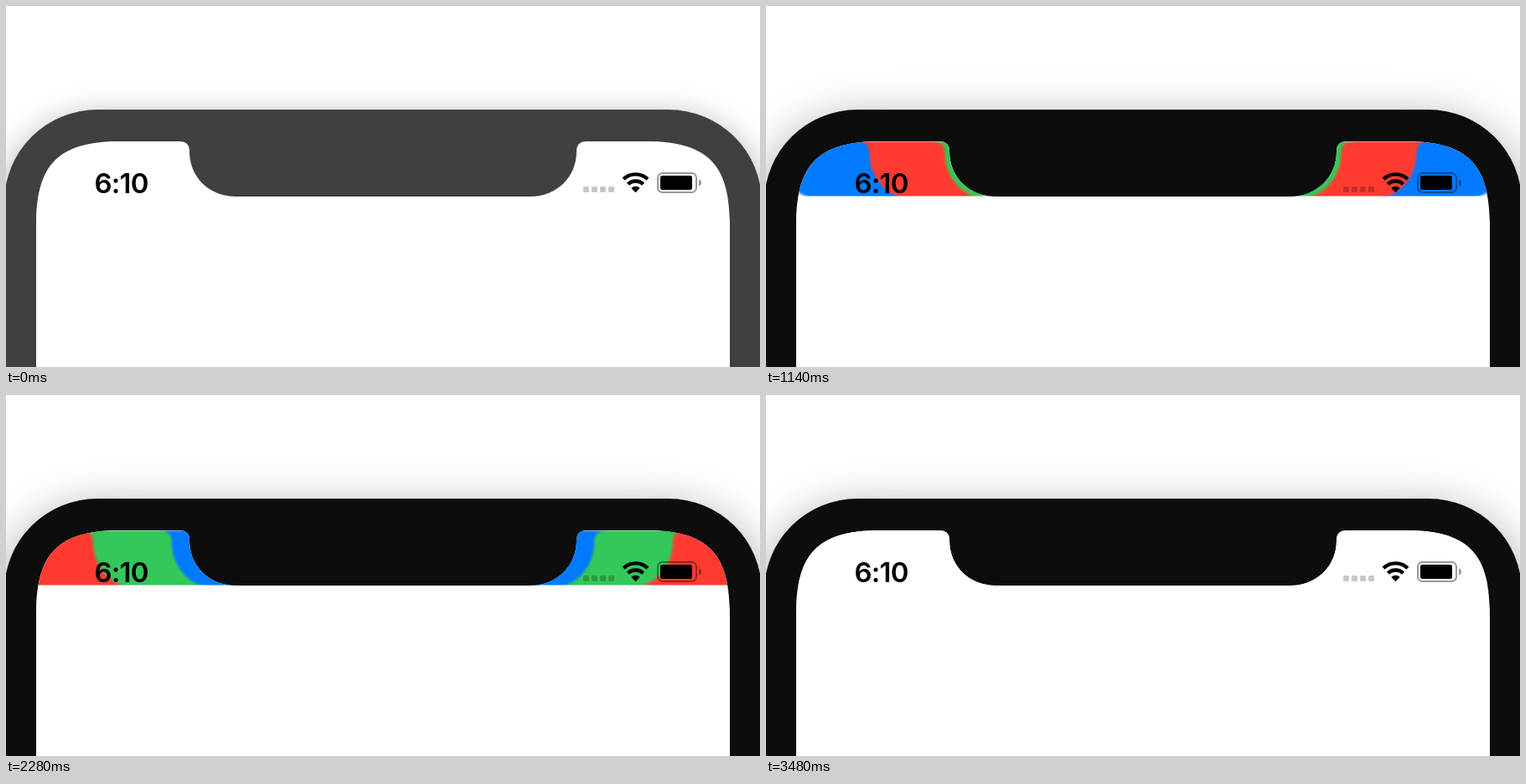
Animation of 900x432 px, one loop 3.54 s. Source, as an HTML page:

```html
<!DOCTYPE html>
<html lang="en">
<head>
<meta charset="utf-8">
<title>Notch ripple</title>
<style>
  html, body { margin: 0; width: 100%; height: 100%; overflow: hidden; background: #fff; }
  svg { display: block; width: 900px; height: 432px; }
  #phone { fill: #404040; }
  #phone.active { fill: #0d0d0d; }
  #phone .on, #phone.active .off { visibility: hidden; }
  #phone.active .on { visibility: visible; }
  text { font: 600 33px Inter, "Liberation Sans", sans-serif; letter-spacing: -.8px; }
</style>
</head>
<body>
<svg viewBox="0 0 900 432">
  <defs>
    <path id="body" d="M-2 800V235A111 111 0 0 1 109 124H791A111 111 0 0 1 902 235V800Z"/>
    <path id="half" d="M36 500V264C36 195 57 162 135 162H207Q219 162 219 174C219 205 243 228 274 228H450.5V500Z"/>
    <clipPath id="bar"><rect x="30" y="162.4" width="420" height="65"/></clipPath>
    <clipPath id="ear" clip-path="url(#bar)"><use href="#half"/></clipPath>
    <filter id="soft" filterUnits="userSpaceOnUse" x="0" y="130" width="470" height="120" color-interpolation-filters="sRGB">
      <feGaussianBlur stdDeviation="1.4"/>
    </filter>
    <filter id="glowOff" filterUnits="userSpaceOnUse" x="-150" y="0" width="1200" height="950">
      <feGaussianBlur stdDeviation="20"/>
    </filter>
    <filter id="glowOn" filterUnits="userSpaceOnUse" x="-150" y="0" width="1200" height="950">
      <feGaussianBlur stdDeviation="30"/>
    </filter>
    <linearGradient id="fade">
      <stop offset="0" stop-color="#fff" stop-opacity="0"/>
      <stop offset="1" stop-color="#fff"/>
    </linearGradient>
  </defs>

  <g id="phone">
    <g fill="#000">
      <use class="off" href="#body" y="10" opacity=".35" filter="url(#glowOff)"/>
      <use class="on" href="#body" y="16" opacity=".4" filter="url(#glowOn)"/>
    </g>
    <use href="#body"/>
  </g>

  <g id="side">
    <use href="#half" fill="#fff"/>
    <g clip-path="url(#ear)">
      <g id="waves" filter="url(#soft)"></g>
      <g id="tail">
        <rect x="-1" y="150" width="2" height="90" fill="url(#fade)"/>
        <rect x="0.99" y="150" width="60" height="90" fill="#fff"/>
      </g>
    </g>
  </g>
  <use href="#side" transform="translate(900) scale(-1 1)"/>

  <text x="105.5" y="223.5">6:10</text>
  <g fill-opacity=".22">
    <rect x="689" y="216" width="7" height="7" rx="1.5"/>
    <rect x="699" y="216" width="7" height="7" rx="1.5"/>
    <rect x="709" y="216" width="7" height="7" rx="1.5"/>
    <rect x="719" y="216" width="7" height="7" rx="1.5"/>
  </g>
  <g fill="none" stroke="#000" stroke-width="4.4">
    <path d="M737.1 207.2A20.8 20.8 0 0 1 765.9 207.2"/>
    <path d="M742.4 213.2A13 13 0 0 1 760.6 213.2"/>
  </g>
  <path d="M751.5 223.2L746.3 218A7.4 7.4 0 0 1 756.7 218Z"/>
  <rect x="778" y="200" width="46" height="23" rx="5.5" fill="none" stroke="#000" stroke-opacity=".4" stroke-width="2"/>
  <rect x="781" y="203" width="38" height="17" rx="2.5"/>
  <path d="M827 207.5Q830 208.5 830 211.5T827 215.5Z" fill-opacity=".4"/>
</svg>

<script>
  const LOOP = 3540, STEP = 60;
  const FOCUS = 420;
  const FIRST = 631, GAP = 272;
  const FADE = 2700, FADE_LEN = 780;
  const BLUE = '#007aff', RED = '#ff3b30', GREEN = '#34c759';
  const SHAPE = 'M205 150V162Q219 162 219 176C219 207 243 232 274 232H900V150Z';

  const byId = id => document.getElementById(id);
  const phone = byId('phone'), tail = byId('tail');

  const waves = [BLUE, RED, GREEN, BLUE, RED, GREEN, BLUE].map(color => {
    const path = document.createElementNS('http://www.w3.org/2000/svg', 'path');
    path.setAttribute('d', SHAPE);
    path.setAttribute('fill', color);
    return byId('waves').appendChild(path);
  });

  // Distance of a wave front from the notch, gently accelerating.
  function reach(ms) {
    const s = Math.max(ms / 1000, -0.22);
    return 16 + 305 * s + 130 * s * s;
  }

  function draw(t) {
    phone.classList.toggle('active', t >= FOCUS);
    waves.forEach((wave, i) => {
      wave.setAttribute('transform', `translate(${-reach(t - FIRST - i * GAP)})`);
    });
    const u = Math.max((t - FADE) / FADE_LEN, -0.5);
    tail.setAttribute('transform', `translate(${219 - 222 * u}) scale(${24 + 8 * u} 1)`);
  }

  function tick() {
    const t = performance.now() % LOOP;
    draw(Math.floor(t / STEP) * STEP);
    requestAnimationFrame(tick);
  }
  tick();
</script>
</body>
</html>
```
